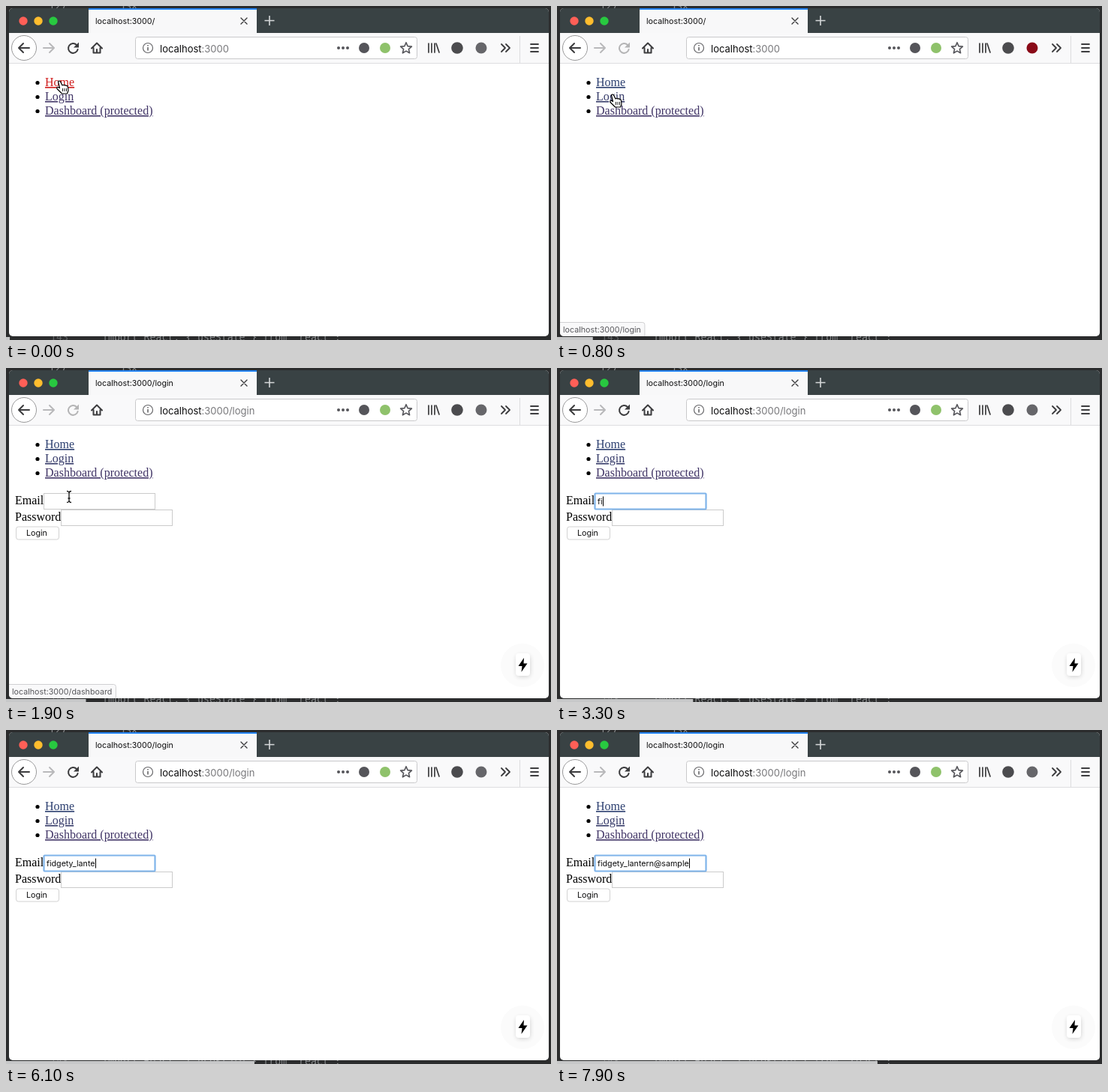
Write an HTML page that moves like this. It is 726x446 px and loops after 8 s.

```html
<!DOCTYPE html>
<html lang="en">
<head>
<meta charset="utf-8">
<title>Login demo</title>
<style>
  html, body { margin: 0; width: 100%; height: 100%; overflow: hidden; background: #2b2c2d; }
  svg { display: block; width: 726px; height: 446px; }
  text { white-space: pre; }
  .ui { font-family: Inter, Roboto, sans-serif; font-size: 10.7px; fill: #0c0c0d; }
  .url { font-size: 13px; }
  .page { font: 16px "Liberation Serif", "Times New Roman", serif; fill: #000; }
  .link { text-decoration: underline; text-decoration-skip-ink: none; fill: #403466; }
  .code { font: 13.2px "DejaVu Sans Mono", monospace; fill: #85888a; }
  .icon { fill: none; stroke: #3c3c3e; stroke-width: 2; stroke-linecap: round; stroke-linejoin: round; }
</style>
</head>
<body>
<svg viewBox="0 0 726 446">
  <defs>
    <filter id="soft" x="-50%" y="-50%" width="200%" height="200%"><feGaussianBlur stdDeviation="3"/></filter>
    <clipPath id="window"><rect x="4" y="3" width="719" height="438" rx="5"/></clipPath>
  </defs>

  <rect width="726" height="446" fill="#2b2c2d"/>
  <g class="code">
    <text x="57" y="5">127</text><text x="151" y="5">JSX</text>
    <text x="59" y="447" opacity=".6">143</text>
    <text x="128" y="447">import React, { useState } from "react";</text>
  </g>
  <rect id="progress" y="442" height="4" fill="#c6c7c8"/>

  <g clip-path="url(#window)">
    <rect x="4" y="3" width="719" height="438" fill="#fff"/>
    <rect x="4" y="3" width="719" height="33" fill="#394244"/>
    <rect x="110" y="3" width="224" height="33" fill="#f8f8f9"/>
    <rect x="110" y="3" width="224" height="2" fill="#2484f5"/>
    <rect x="4" y="36" width="719" height="41" fill="#f9f9fa"/>
    <path d="M4 76.5H723" stroke="#dedee0"/>
    <circle cx="23" cy="20" r="5.7" fill="#ff5f57"/>
    <circle cx="43" cy="20" r="5.7" fill="#ffbd2e"/>
    <circle cx="63" cy="20" r="5.7" fill="#28c940"/>
    <text id="tab" class="ui" x="119" y="24"/>
    <path class="icon" d="M313 16l8 8m0-8l-8 8" style="stroke-width:1.4"/>
    <path d="M351 13v13m-6.5-6.5h13" stroke="#d5d8d9" stroke-width="1.6"/>

    <circle cx="24" cy="56" r="16.5" fill="#fff" stroke="#9a9a9b"/>
    <path class="icon" d="M31 56H17m6-6l-6 6 6 6"/>
    <path class="icon" d="M50 56h14m-6-6l6 6-6 6" style="stroke:#b9b9bb"/>
    <g id="reload">
      <path class="icon" d="M94 52a6.4 6.4 0 1 0 1.6 6" />
      <path d="M97 48.5v7h-7z" fill="#3c3c3e"/>
    </g>
    <path class="icon" d="M114 56.5l7-7 7 7M116.500 56v6.500h9V56M121 62v-4"/>

    <rect x="172.500" y="41.500" width="375" height="29" rx="3" fill="#fff" stroke="#c9c9cb"/>
    <circle cx="189" cy="56" r="6.500" fill="none" stroke="#67676a" stroke-width="1.2"/>
    <path d="M189 55v4.500m0-7.500v1.500" stroke="#67676a" stroke-width="1.6"/>
    <text class="ui url" x="205" y="62">localhost<tspan id="path" fill="#77777a"/></text>
    <g fill="#55555a">
      <circle cx="443" cy="56" r="2"/><circle cx="449" cy="56" r="2"/><circle cx="455" cy="56" r="2"/>
      <circle cx="477" cy="56" r="7"/>
    </g>
    <circle cx="505" cy="56" r="7" fill="#8fc26b"/>
    <path id="star" class="icon" style="stroke:#55555a;stroke-width:1.6"/>
    <path class="icon" d="M563 50v12m4-12v12m4-12v12m2-12l4 12" style="stroke-width:1.7"/>
    <circle cx="601" cy="56" r="7.800" fill="#4b4b4e"/>
    <circle id="badge" cx="633" cy="56" r="7.500"/>
    <path class="icon" d="M660 51l5 5-5 5m6-10l5 5-5 5" style="stroke-width:1.800"/>
    <path d="M684.500 40v36" stroke="#dcdcde"/>
    <path class="icon" d="M699 51h10m-10 5h10m-10 5h10" style="stroke-width:1.800"/>

    <g class="page">
      <circle cx="42" cy="102.500" r="2.600"/><circle cx="42" cy="121.500" r="2.600"/><circle cx="42" cy="140.500" r="2.600"/>
      <text id="home" class="link" x="52" y="107">Home</text>
      <text id="login" class="link" x="52" y="126">Login</text>
      <text class="link" x="52" y="145">Dashboard (protected)</text>
    </g>

    <g id="form">
      <text class="page" x="12" y="182">Email</text>
      <text class="page" x="12" y="204">Password</text>
      <rect x="50.500" y="167.500" width="148" height="21" fill="#fff" stroke="#cbcbcb"/>
      <rect x="73.500" y="189.500" width="148" height="21" fill="#fff" stroke="#cbcbcb"/>
      <rect id="focus" x="50.500" y="167.500" width="148" height="21" rx="1" fill="none" stroke="#7fb4ea" stroke-width="2.200"/>
      <rect x="13.500" y="212" width="57" height="17" rx="3" fill="#fff" stroke="#d2d2d2"/>
      <text class="ui" x="27" y="224">Login</text>
      <text id="email" class="ui" x="54" y="182"/>
      <path id="caret" d="M0 171.500v13" stroke="#000"/>
      <circle cx="688" cy="397" r="29" fill="#fbfbfb"/>
      <rect x="680" y="384" width="18" height="28" rx="4" fill="#000" opacity=".18" filter="url(#soft)"/>
      <rect x="679" y="381" width="19" height="30" rx="4" fill="#fff"/>
      <path d="M690 387l-7.500 11h5l-1 8 8-11.500h-5z" fill="#000"/>
    </g>

    <g id="status">
      <path id="statusBox" fill="#f9f9fa" stroke="#d0d0d2"/>
      <text id="statusText" class="ui" x="8" y="436" style="fill:#56565a"/>
    </g>
  </g>

  <g id="hand" stroke="#000" stroke-linejoin="round">
    <path d="M-2.500 1Q-1.500-1 .5 1L3 6Q4 4.500 5.500 6Q7 5 8 6.500Q10 6 10.500 8.500L11 13 9.500 17H2.500L-4 10.500Q-5 8 -2.500 8.500L-.5 9.500Z" fill="#fff" stroke-width="1.200"/>
    <path d="M3.500 10v4m2.500-4v4m2.500-4v4" stroke-width=".9"/>
  </g>
  <path id="beam" d="M-3-7.500Q0-7.500 0-5Q0-7.500 3-7.500M0-5V5M-3 7.500Q0 7.500 0 5Q0 7.500 3 7.500M-1.500 2h3" fill="none" stroke="#111" stroke-width="1.300"/>
</svg>
<script>
const LOOP = 8000;
const EMAIL = "fidgety_lantern@sample";
const $ = id => document.getElementById(id);
const show = (id, on) => $(id).setAttribute("visibility", on ? "visible" : "hidden");
const between = (t, a, b) => t >= a && t < b;

// Typing bursts: [first key time, last key time, number of keys]
const bursts = [[2950, 3200, 2], [3400, 4000, 5], [4750, 6000, 6], [6250, 7850, 9]];
const keys = bursts.flatMap(([from, to, n]) =>
  Array.from({ length: n }, (_, i) => from + (to - from) * i / (n - 1)));

// Pointer stops: [time, x, y]
const stops = [[0, 72, 100], [300, 72, 100], [650, 75, 118], [1250, 75, 118], [1550, 79, 139], [1850, 84, 172]];

function pointerAt(t) {
  const next = stops.findIndex(s => s[0] > t);
  if (next < 0) return stops[stops.length - 1].slice(1);
  const [t0, x0, y0] = stops[next - 1], [t1, x1, y1] = stops[next];
  const p = (t - t0) / (t1 - t0), e = p * p * (3 - 2 * p);
  return [x0 + (x1 - x0) * e, y0 + (y1 - y0) * e];
}

function starPath(cx, cy) {
  const points = Array.from({ length: 10 }, (_, i) => {
    const r = i % 2 ? 3.6 : 7.8, a = i * Math.PI / 5 - Math.PI / 2;
    return (cx + r * Math.cos(a)).toFixed(1) + " " + (cy + r * Math.sin(a)).toFixed(1);
  });
  return "M" + points.join("L") + "Z";
}

function drawStatus(t) {
  const page = between(t, 550, 1400) ? "login" : between(t, 1400, 2150) ? "dashboard" : "";
  show("status", page);
  if (!page) return;
  $("statusText").textContent = "localhost:3000/" + page;
  const right = 13 + $("statusText").getComputedTextLength();
  $("statusBox").setAttribute("d", `M3 422.500H${right - 3}q3 0 3 3V442H3Z`);
}

function drawEmail(t) {
  const typed = keys.filter(k => k <= t).length;
  $("email").textContent = EMAIL.slice(0, typed);
  const focusTime = 2400;
  const since = t - (typed ? keys[typed - 1] : focusTime);
  const width = typed ? $("email").getComputedTextLength() : 0;
  $("caret").setAttribute("transform", `translate(${Math.round(54 + width) + .5} 0)`);
  show("focus", t >= focusTime);
  show("caret", t >= focusTime && since % 1000 < 500);
}

function drawPointer(t) {
  const [x, y] = pointerAt(t);
  const overField = y > 150;
  for (const id of ["hand", "beam"]) $(id).setAttribute("transform", `translate(${x} ${y})`);
  show("hand", !overField);
  show("beam", overField && t < keys[0]);
}

function render(t) {
  const onLogin = t >= 1250;
  $("progress").setAttribute("width", 5 + t * .0534);
  $("tab").textContent = "localhost:3000/" + (onLogin ? "login" : "");
  $("path").textContent = ":3000" + (onLogin ? "/login" : "");
  $("home").style.fill = t < 200 ? "#d01c1c" : "#2c3f70";
  $("login").style.fill = between(t, 1050, 1250) ? "#d01c1c" : t < 200 ? "#403466" : "#353a69";
  $("reload").setAttribute("opacity", between(t, 300, 2400) ? .36 : 1);
  $("badge").setAttribute("fill", between(t, 400, 1300) ? "#8a0a18" : "#66666a");
  $("form").style.display = onLogin ? "" : "none";
  drawStatus(t);
  if (onLogin) drawEmail(t);
  else { show("focus", false); show("caret", false); }
  drawPointer(t);
}

$("star").setAttribute("d", starPath(533, 56.5));
const start = performance.now();
function tick() {
  render((performance.now() - start) % LOOP);
  requestAnimationFrame(tick);
}
tick();
</script>
</body>
</html>
```
